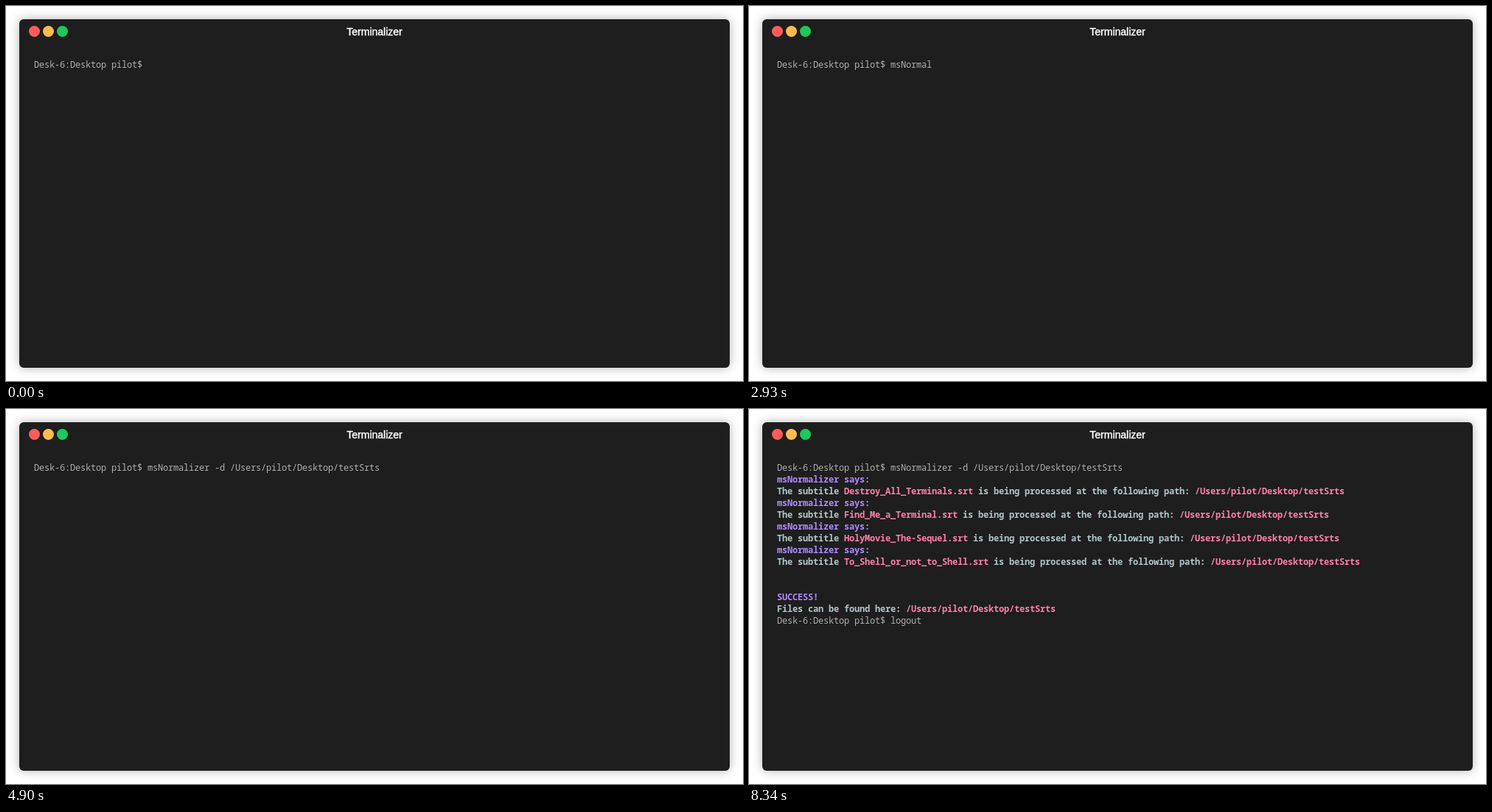
Recreate the animation shown at these times as an HTML page. Size 1000 by 510 pixels, loop 9.1 s.

```html
<!DOCTYPE html>
<html lang="en">
<head>
<meta charset="utf-8">
<title>Terminal session</title>
<style>
  html, body { margin: 0; width: 100%; height: 100%; overflow: hidden; background: #fff; }
  svg { display: block; }
  .window { filter: drop-shadow(0 0 7px rgba(0, 0, 0, .3)); }
  .title { font: 14px "Liberation Sans", Arial, sans-serif; fill: #fff; stroke: #fff; stroke-width: .4px; text-anchor: middle; }
  .line { font: 500 12px "Noto Sans Mono", "DejaVu Sans Mono", monospace; letter-spacing: -.2px; fill: #afafaf; white-space: pre; }
  .violet, .pink, .pale { font-weight: 700; }
  .violet { fill: #ae89fe; }
  .pink { fill: #ff7fac; }
  .pale { fill: #b1c6ca; }
</style>
</head>
<body>
<svg width="1000" height="510" viewBox="0 0 1000 510">
  <rect class="window" x="18" y="18" width="964" height="474" rx="6" fill="#1e1e1e"/>
  <circle cx="38.5" cy="34.5" r="7.5" fill="#ff5c5c"/>
  <circle cx="57.5" cy="34.5" r="7.5" fill="#ffbc4e"/>
  <circle cx="76.5" cy="34.5" r="7.5" fill="#1ec85c"/>
  <text class="title" x="500" y="40">Terminalizer</text>
  <g id="screen"></g>
</svg>
<script>
const LOOP = 9100;
const OUTPUT_AT = 6330, PROMPT_AT = 6430, LOGOUT_AT = 8340;
const PROMPT = "Desk-6:Desktop pilot$ ";
const FOLDER = "/Users/pilot/Desktop/testSrts";
const COMMAND = "msNormalizer -d " + FOLDER;
const FILES = ["Destroy_All_Terminals", "Find_Me_a_Terminal", "HolyMovie_The-Sequel", "To_Shell_or_not_to_Shell"];

// One key per time; the space arrives together with the dash.
const KEY_TIMES = [1500, 1680, 2010, 2220, 2360, 2580, 2780, 2930, 3010, 3160, 3280, 3450, 3770, 3770, 3990];
const PASTE_AT = 4900;

const screen = document.getElementById("screen");

function addLine(row, ...spans) {
  const line = document.createElementNS("http://www.w3.org/2000/svg", "text");
  line.setAttribute("class", "line");
  line.setAttribute("x", 38);
  line.setAttribute("y", 84 + 16 * row);
  for (const [text, style] of spans) {
    const span = document.createElementNS(line.namespaceURI, "tspan");
    span.setAttribute("class", style);
    span.textContent = text;
    line.append(span);
  }
  screen.append(line);
  return line;
}

const commandLine = addLine(0, [PROMPT, ""]);
const output = FILES.flatMap((file, i) => [
  addLine(2 * i + 1, ["msNormalizer says:", "violet"]),
  addLine(2 * i + 2, ["The subtitle ", "pale"], [file + ".srt", "pink"],
    [" is being processed at the following path: ", "pale"], [FOLDER, "pink"])
]);
output.push(
  addLine(11, ["SUCCESS!", "violet"]),
  addLine(12, ["Files can be found here: ", "pale"], [FOLDER, "pink"])
);
const lastLine = addLine(13, [PROMPT, ""]);

function setText(line, text) {
  if (line.textContent !== text) line.firstChild.textContent = text;
}

function draw(now) {
  const t = now % LOOP;
  const typed = t < PASTE_AT ? KEY_TIMES.filter(time => time <= t).length : COMMAND.length;
  setText(commandLine, PROMPT + COMMAND.slice(0, typed));
  for (const line of output) line.style.display = t < OUTPUT_AT ? "none" : "";
  setText(lastLine, t < PROMPT_AT ? "" : PROMPT + (t < LOGOUT_AT ? "" : "logout"));
}

const start = performance.now();
function tick() {
  draw(performance.now() - start);
  requestAnimationFrame(tick);
}
tick();
</script>
</body>
</html>
```
